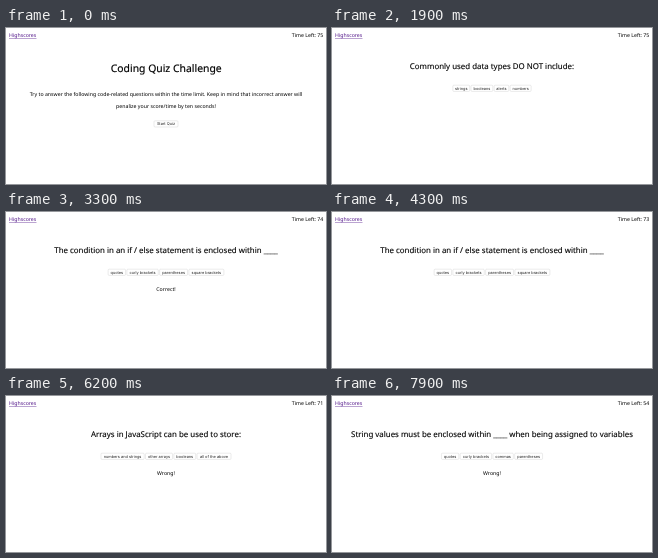
An HTML page for the animation above (8 s loop, 320 px wide and 156 px high).

```html
<!DOCTYPE html>
<html lang="en">
<head>
<meta charset="utf-8">
<title>Coding Quiz</title>
<style>
  html, body { margin: 0; width: 100%; height: 100%; overflow: hidden; background: #fff; }
  svg { display: block; width: 100vw; height: 100vh; }
  text { font: 5.236px "Noto Sans", "Open Sans", sans-serif; fill: #000; text-rendering: geometricPrecision; }
  .mid { text-anchor: middle; }
  .end { text-anchor: end; }
  .link { fill: #551a8b; }
  .title { font-size: 10.4px; stroke: #000; stroke-width: .16px; }
  .question { font-size: 7.9px; stroke: #000; stroke-width: .12px; }
  .button rect { fill: #fff; stroke: #c6c6c6; stroke-width: .35px; }
  .button text { font: 3.9px Inter, "Noto Sans", sans-serif; fill: #222; text-anchor: middle; }
  .button.down rect { fill: url(#press); stroke: #3f6fd0; }
  .button.down text { fill: #0b1c4a; }
</style>
</head>
<body>
<svg id="stage" viewBox="0 0 320 156">
  <defs>
    <linearGradient id="press" x2="0" y2="1">
      <stop stop-color="#6fa2f5"/>
      <stop offset="1" stop-color="#3c72e4"/>
    </linearGradient>
  </defs>
</svg>
<script>
const LOOP = 8000, GAP = 1.35, BUTTON_H = 6.2;
const stage = document.getElementById('stage');

const buttonWidth = {
  'Start Quiz': 24, 'strings': 16.8, 'booleans': 21.8, 'alerts': 14.6, 'numbers': 21,
  'quotes': 17.4, 'curly brackets': 31.4, 'parentheses': 27.9, 'square brackets': 35,
  'numbers and strings': 43.2, 'other arrays': 27, 'all of the above': 34, 'commas': 20.4
};

// start: when the page appears, press: when the chosen button goes down
const pages = [
  { start: 0, press: 1700, pick: 'Start Quiz', answers: ['Start Quiz'] },
  { start: 1900, press: 3200, pick: 'alerts',
    question: 'Commonly used data types DO NOT include:',
    answers: ['strings', 'booleans', 'alerts', 'numbers'] },
  { start: 3300, press: 6000, pick: 'quotes',
    question: 'The condition in an if / else statement is enclosed within ____',
    answers: ['quotes', 'curly brackets', 'parentheses', 'square brackets'],
    verdict: 'Correct!', fade: [3900, 4300] },
  { start: 6200, press: 7700, pick: 'other arrays',
    question: 'Arrays in JavaScript can be used to store:',
    answers: ['numbers and strings', 'other arrays', 'booleans', 'all of the above'],
    verdict: 'Wrong!', fade: [6900, 7100] },
  { start: 7900, press: LOOP, pick: '',
    question: 'String values must be enclosed within ____ when being assigned to variables',
    answers: ['quotes', 'curly brackets', 'commas', 'parentheses'],
    verdict: 'Wrong!', fade: [LOOP, LOOP] }
];

const ticks = [[0, 75], [2900, 74], [3900, 73], [4900, 72], [5900, 71], [6900, 55], [7900, 54]];

function add(parent, tag, attrs = {}, content = '') {
  const el = document.createElementNS('http://www.w3.org/2000/svg', tag);
  for (const key in attrs) el.setAttribute(key, attrs[key]);
  el.textContent = content;
  return parent.appendChild(el);
}

const label = (parent, content, x, y, cls = 'mid') =>
  add(parent, 'text', { x, y, class: cls }, content);

function addButton(parent, name, x, y) {
  const g = add(parent, 'g', { class: 'button' });
  const width = buttonWidth[name];
  add(g, 'rect', { x, y, width, height: BUTTON_H, rx: 1 });
  label(g, name, x + width / 2, y + 4.45);
  return g;
}

function buildPage(page) {
  const g = page.group = add(stage, 'g');
  if (page.question) {
    label(g, page.question, 160, 40.5, 'mid question');
  } else {
    label(g, 'Coding Quiz Challenge', 160.2, 44.4, 'mid title');
    label(g, 'Try to answer the following code-related questions within the time limit. Keep in mind that incorrect answer will', 160, 68.3);
    label(g, 'penalize your score/time by ten seconds!', 160, 79.8);
  }
  const total = page.answers.reduce((sum, name) => sum + buttonWidth[name] + GAP, -GAP);
  let x = 160 - total / 2;
  for (const name of page.answers) {
    const button = addButton(g, name, x, page.question ? 57.2 : 92.8);
    if (name === page.pick) page.button = button;
    x += buttonWidth[name] + GAP;
  }
  if (page.verdict) page.note = label(g, page.verdict, 160, 78.8);
}

label(stage, 'Highscores', 3, 9.4, 'link');
add(stage, 'rect', { x: 3, y: 10, width: 27.5, height: .4, class: 'link' });
const timer = label(stage, '', 317.3, 9.4, 'end');
pages.forEach(buildPage);

function noteOpacity([from, to], t) {
  if (t < from) return 1;
  return Math.max(0, (to - t) / (to - from + 100));
}

function draw(now) {
  const t = Math.floor(now % LOOP / 100) * 100;
  const current = pages.filter(p => p.start <= t).pop();
  for (const page of pages) {
    page.group.style.display = page === current ? '' : 'none';
  }
  if (current.button) current.button.classList.toggle('down', t >= current.press);
  if (current.note) current.note.style.opacity = noteOpacity(current.fade, t);
  timer.textContent = 'Time Left: ' + ticks.filter(([at]) => at <= t).pop()[1];
}

const begin = performance.now();
function frame() {
  draw(performance.now() - begin);
  requestAnimationFrame(frame);
}
frame();
</script>
</body>
</html>
```
